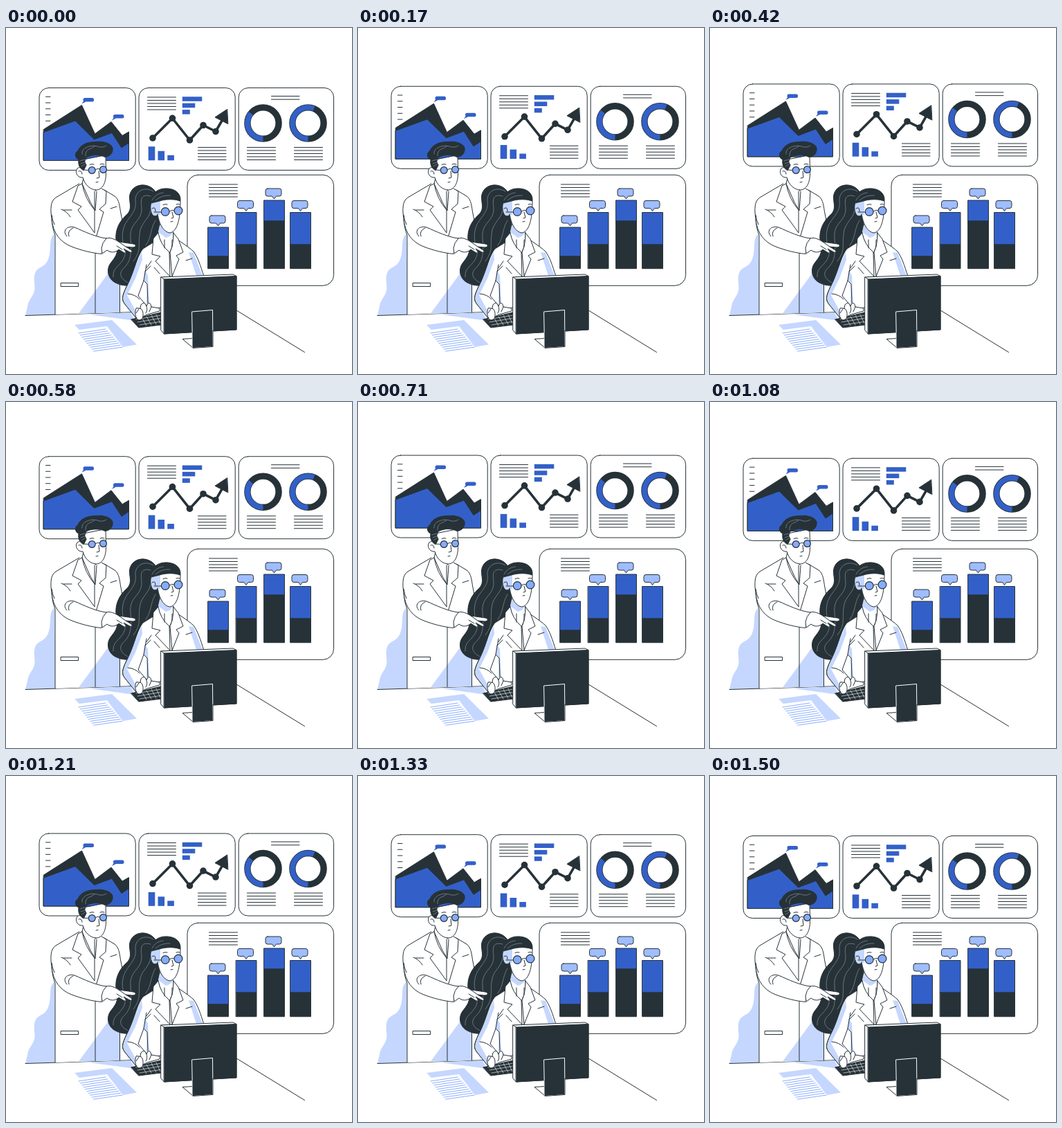
Write an HTML page that moves like this. It is 500 by 500 pixels and loops after 1540 ms.

```html
<!DOCTYPE html>
<html lang="en">
<head>
<meta charset="utf-8">
<title>Data team</title>
<style>
  html, body { margin: 0; width: 100%; height: 100%; overflow: hidden; background: #fff; }
  svg { display: block; width: 100%; height: 100%; stroke-linejoin: round; stroke-linecap: round; }
  .line { fill: none; stroke: #263238; }
  .white { fill: #fff; stroke: #263238; }
  .dark { fill: #263238; stroke: #263238; }
  .blue { fill: #3360c8; stroke: #263238; }
  .flat { fill: #3360c8; }
  .bubble { fill: #9fbdff; stroke: #263238; }
  .shade { fill: #c5d7ff; }
  .lens { fill: #86abff; stroke: #263238; stroke-width: 1.2; }
  .strand { fill: none; stroke: #87939a; stroke-width: .7; }
</style>
</head>
<body>
<svg viewBox="0 0 500 500">
  <g id="board"></g>
  <g id="floating"></g>

  <g id="desk">
    <path class="shade" d="M70 297C61 305 66 319 62 331C58 346 48 344 43 352C38 361 43 371 41 380C38 390 32 393 31 403L28 415.500L72 414Z"/>
    <path class="line" d="M28 415.500L188 410.500M333 408L431.500 468.500"/>
    <path class="shade" d="M120 414L180 411L186 423Z"/>
    <path class="shade" d="M99 429L153 422L189 457.500L169 461L146 431L106 436Z"/>
    <path id="sheet" fill="none" stroke="#7ba3ff" stroke-width=".9"/>
  </g>

  <g id="man">
    <path fill="#fff" d="M104 226L70 247C63 253 64 263 66 277L71 301V414L165 411V330L168 278C166 262 165 250 160 246L142 234Z"/>
    <path class="shade" d="M105 412.500L151 350L165 342V411Z"/>
    <path class="line" d="M106 225L72 245C64 250 64 262 66 276Q67 290 71 299V414M142 234L157 243C164 248 164 258 166 268L168 278M129 322V411.500M164.500 341V411M79.500 368.500H104.500V373.500H79.500Z"/>
    <path class="white" d="M112 216L110 225L122 252L129 264L131 237Z"/>
    <path class="line" d="M110 225L104 228L96 251L109 258L104 263L128 296V236M138 232L145 236L144 254L135 262L141 266L130 303M110 225Q114 247 128 263M80 262Q88 265 93 273M83 263L95 263M151 261L160 258"/>
    <path class="white" d="M114 190L113 203Q108 199 103 203C99 208 103 217 111 216C114 227 122 234 131 234C141 233 145 221 144.500 207L144 184Z"/>
    <path class="line" d="M105 207Q109 205 110 211"/>
    <path class="dark" d="M112 205.500C106 203 104 197 105 190C99 188 99 180 104 177.500C107 169 117 164.500 130 164.500C141 163 152 167 154 173C155 181 150 186 143 186.500C134 182 124 183 116 187L113.500 193L116 198Z"/>
    <path class="strand" d="M110 182C108 174 122 168 132 171Q139 174 145 170M115 185Q114 176 123 174L128 171M107 192L114 190M108 196L114 194M109 200L114 197"/>
    <path class="line" d="M111 205L119 205.500M129 205Q132 202 135.500 204M121 197.500Q124 196 127 197M136 197Q139 195.500 142 197M134 207L135 216L131 217M130 223L133 222.500"/>
    <circle class="lens" cx="124.200" cy="205.500" r="4.900"/>
    <circle class="lens" cx="140.500" cy="204.500" r="4.900"/>
  </g>

  <g id="ponytail">
    <path class="dark" d="M217 238C207 221 181 224 178.500 243C178 255 184 262 172 272C159 285 157 300 160 313C163 326 157 332 151 340C144 350 148 363 158 368C167 373 181 374 188 369L199 336L213 313L224 292L219 270Z"/>
    <path class="strand" d="M213 236C200 228 186 236 187 250C190 268 172 275 169 293C165 315 178 320 169 335C162 346 154 347 155 360M209 243C191 238 196 254 196 261C196 281 178 280 180 304C182 326 180 337 171 346C160 356 168 365 179 369M210 258C209 277 194 280 193 298C191 314 196 321 184 337M216 278C208 291 211 302 202 314"/>
  </g>

  <g id="pointing-arm">
    <path class="white" d="M66 276C68 297 79 310 95 316C108 321 123 325 138 326.500L145 304C129 302 113 294 99 288C87 285 81 294 88 301"/>
    <path class="line" d="M91 301Q88 293 97 289M66 270Q67 278 70 284"/>
    <path class="white" d="M145 304C150 302 157 305 163 309L184 312C189 313 188 317 183 317L173 316L181 321Q184 325 179 324L170 319Q176 326 171 325L163 320C158 325 151 325 146 321L139 326L138 318Q139 310 145 304Z"/>
    <path class="line" d="M163 309L173 316M160 315L168 320"/>
  </g>

  <g id="woman">
    <path class="white" d="M214 309L198 319C190 327 185 352 177 368C169 384 166 391 171 398L188 419L204 409L226 403V360L286 359C281 343 277 331 271 323Q266 318 248 306Z"/>
    <path class="shade" d="M196 323L197 335L187 362L175 386L188 410L186 417L171 398L169 388L184 352ZM200 350L205 357L207 397L203 399L204 370L199 364ZM264 324L271 325L284 358H275Z"/>
    <path class="line" d="M198 319C190 327 185 352 177 368C169 384 166 391 171 398L187 418M203 342L199 365L191 387L203 401M199 365L204 370L205 397M176 384Q187 385 193 392M203 347L210 337M201 352L209 344"/>
    <path class="white" d="M221 290L219 297L227 317L236 326L242 311V296Z"/>
    <path class="shade" d="M222 285L243 293Q238 302 231 303L220 295Z"/>
    <path class="white" d="M220 296L213 304L211 327L223 330L216 337L237 359L236 324Q223 313 220 296Z"/>
    <path class="white" d="M242 296L249 305L256 324L246 329L250 334L240 359L237 324Q242 314 242 296Z"/>
    <path class="line" d="M229 306V318M240 306V316M214 346L222 355M260 336L269 333"/>
    <path class="white" d="M215 247C207 249 208 266 213 271Q218 273 219 268C221 282 227 295 237 296C247 294 252 278 252 250L229 243Z"/>
    <path class="shade" d="M215 248C208 250 208 265 213 270.500Q218 273 219 268L223 271V249Z"/>
    <path class="dark" d="M209 253C209 239 219 231 234 232C246 233 253 240 252 250C244 247 231 247 222 250L214 252Z"/>
    <path class="strand" d="M211 249Q216 239 227 238M216 249Q225 241 237 242"/>
    <path class="line" d="M211 261Q216 257 216 265M214 266L224 266M236 265Q240 262 243 264M227 255.500Q230 254 233 255M246 255Q249 253.500 251 255M240 266L242 274L239 275M238 280L241 279.500"/>
    <circle class="lens" cx="230.200" cy="265.500" r="5.900"/>
    <circle class="lens" cx="249" cy="264" r="5.900"/>
  </g>

  <g id="computer">
    <path class="dark" d="M181 421L224 411L232 428L192 433Z"/>
    <path stroke="#fff" stroke-width=".6" fill="none" d="M188 421L225 415M190 425L226 419M193 429L226 424M196 418L203 430M203 417L210 429M210 415L217 428M217 414L223 427"/>
    <path class="white" d="M188 405Q185 413 189 420Q192 424 197 420L198 417L204 414L222 409V405L210 403Q209 396 205 398L203 402Q200 394 195 400L194 405Z"/>
    <path class="line" d="M194 405Q199 407 198 417M203 402Q205 408 202 412M188 412L192 406M210 403L207 410"/>
    <path class="white" d="M224 360L328 356L333 358.500V436L228.500 442L224 437Z"/>
    <path class="dark" d="M228.500 363L333 358.500V436L228.500 442Z"/>
    <path class="line" d="M224 360L228.500 363"/>
    <path class="white" d="M270 448.500L255 449.500L270 462Z"/>
    <path fill="#263238" stroke="#fff" d="M269 410L298.500 407.500L299 460.500L270 462.500Z"/>
    <path class="line" d="M299 437V460.500L270 462.500V440"/>
  </g>
</svg>
<script>
const board = document.getElementById("board");
const floating = document.getElementById("floating");

function add(parent, tag, attrs) {
  const node = document.createElementNS("http://www.w3.org/2000/svg", tag);
  for (const key in attrs) node.setAttribute(key, attrs[key]);
  parent.append(node);
}
const path = (parent, cls, d, width = 1) =>
  add(parent, "path", { class: cls, d, "stroke-width": width });
const rect = (parent, cls, x, y, width, height, rx = 0) =>
  add(parent, "rect", { class: cls, x, y, width, height, rx });

function rows(parent, x, y, width, count, gap = 4.5) {
  for (let i = 0; i < count; i++) path(parent, "line", `M${x} ${y + i * gap}h${width}`);
}

function donut(cx, cy, sweep) {
  const r = 22.6, end = Math.PI / 2 + sweep * Math.PI / 180;
  add(floating, "circle", { class: "line", cx, cy, r, "stroke-width": 9.4 });
  path(floating, "line", `M${cx} ${cy + r}A${r} ${r} 0 ${+(sweep > 180)} 1 ` +
    `${cx + r * Math.cos(end)} ${cy + r * Math.sin(end)}`, 7.6);
  floating.lastChild.style.cssText = "stroke:#3360c8;stroke-linecap:butt";
}

function column(x, top, split) {
  rect(board, "blue", x, top, 29.5, split - top);
  rect(board, "dark", x, split, 29.5, 347.7 - split);
  path(board, "bubble", `M${x + 5} ${top - 17}h17q3 0 3 3v5q0 3-3 3h-4.500l-3 4-3-4h-6.500q-3 0-3-3v-5q0-3 3-3z`);
}

// Large bar chart
rect(board, "white", 262, 212.3, 211.6, 160, 15.5);
rows(board, 293.5, 226, 41, 5);
column(292, 288, 330);
column(332.5, 266.5, 313);
column(373, 249, 279);
column(411, 266.5, 313);

// Area chart
for (const [x, width] of [[48, 139.2], [192, 139.2], [336.2, 137.4]])
  rect(floating, "white", x, 86.5, width, 119, 13.5);
rows(floating, 57.5, 99.3, 6.5, 5, 8.75);
path(floating, "dark", "M54.500 146.500L109.500 111.500L128.500 153L152 135.500L168 155.500L177.500 150V191.500H54.500Z");
path(floating, "blue", "M54.500 150.500L100 134L127.500 161L153 151.500L167 173L177.500 166V191.500H54.500Z");
for (const [x, y] of [[111.5, 101], [155, 125]]) {
  rect(floating, "flat", x, y, 15.5, 5.5, 2.5);
  path(floating, "flat", `M${x + 1} ${y + 4}l-3 4.500 6-3z`);
}

// Trend chart
rows(floating, 204.5, 100, 41, 5);
[28.5, 18.5, 11].forEach((width, i) => rect(floating, "flat", 254.8, 99.3 + i * 9.4, width, 6.5));
path(floating, "line", "M212 159L240.500 130.500L265.500 162L285 140.500L303 149.500L316 127", 3.6);
for (const [cx, cy] of [[212, 159], [240.5, 130.3], [265.5, 162], [285, 140.5], [303, 149.5]])
  add(floating, "circle", { cx, cy, r: 4.8, fill: "#263238" });
path(floating, "dark", "M319.500 117.500L302 129L320.500 138.500Z");
[20, 13.5, 7.5].forEach((height, i) => rect(floating, "flat", 205.7 + i * 13.8, 191.3 - height, 9.6, height));
rows(floating, 277.5, 172.5, 40.5, 5);

// Donut charts
rows(floating, 383.5, 98.5, 40.5, 2, 4.7);
donut(371.5, 137.5, 129);
donut(436.5, 137.5, 202);
rows(floating, 348.5, 172.5, 41, 5);
rows(floating, 416.5, 172.5, 41, 5);

// Printed lines on the sheet of paper
let print = "";
for (let i = 0; i < 10; i++) print += `M${105 + i * 2.4} ${441 + i * 2.9}L${144 + i * 2.7} ${435 + i * 2.9}`;
document.getElementById("sheet").setAttribute("d", print);

// Panels rise 10 px and sink back at constant speed, 24 steps per second
function draw(now) {
  const step = Math.floor((now % 1540) * 0.024 + 0.1);
  const phase = ((step + 0.4) / 18) % 2;
  const lift = 10 * (1 - Math.abs(phase - 1));
  floating.setAttribute("transform", `translate(0 ${0.22 - lift})`);
  requestAnimationFrame(draw);
}
draw(0);
</script>
</body>
</html>
```
